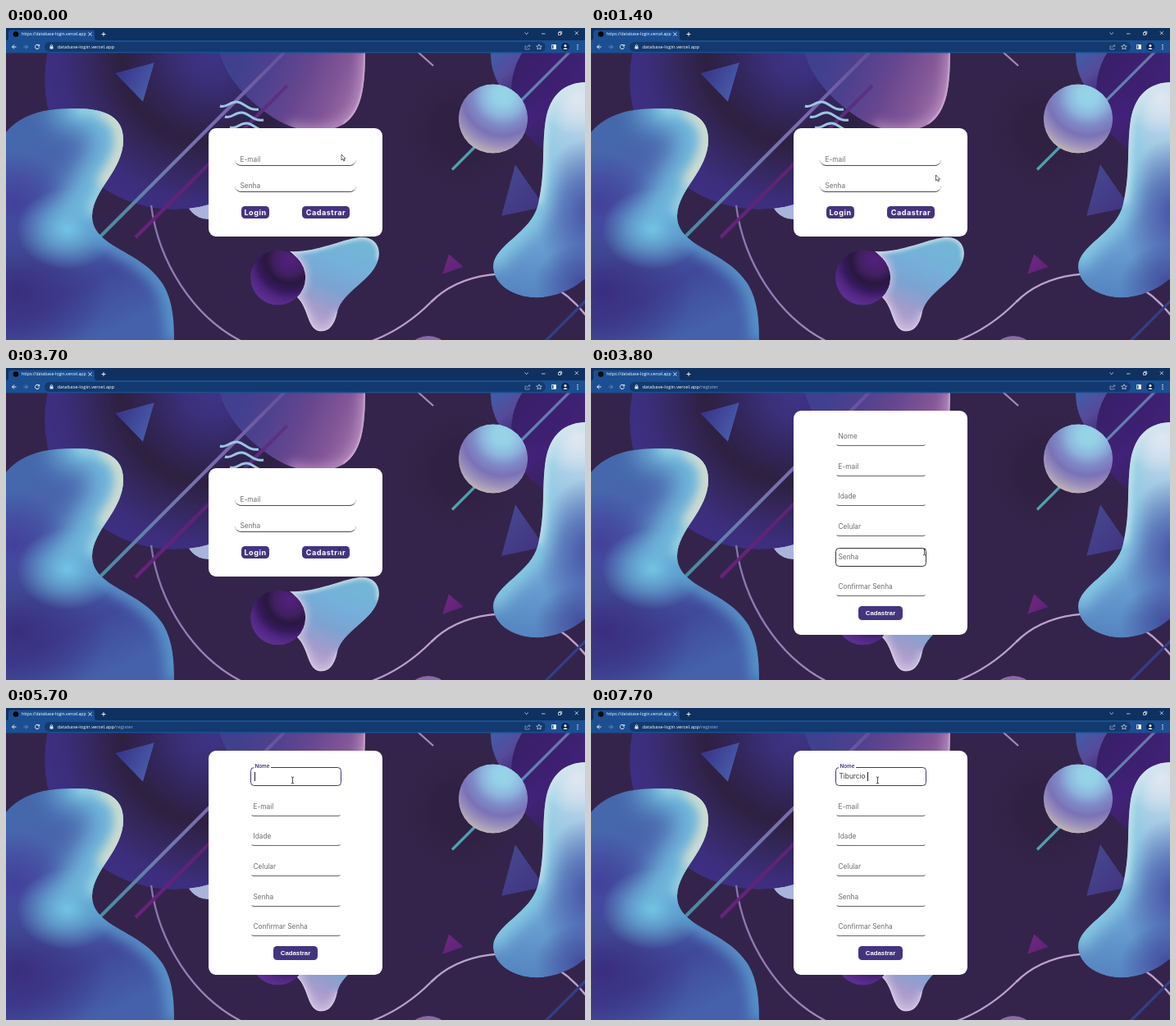
Write an HTML page with a canvas that moves like this. It is 706 px wide and 380 px high and loops after 8000 ms.

```html
<!DOCTYPE html>
<html lang="pt-BR">
<head>
<meta charset="utf-8">
<title>Login</title>
<style>
html, body { margin: 0; width: 100%; height: 100%; overflow: hidden; background: #33234a; }
#stage { position: relative; width: 706px; height: 380px; overflow: hidden; font: 8.3px Inter, sans-serif; color: #6c6b70; cursor: default; }
#stage > * { position: absolute; }
#scene, #bar { left: 0; top: 0; }
#scene { width: 706px; height: 380px; }
.card { left: 247px; width: 212px; background: #fff; border-radius: 9.5px; }
#login { top: 122px; height: 132px; }
#register { top: 52px; height: 273px; }
.card * { position: absolute; box-sizing: border-box; white-space: pre; }
.line { left: 32px; width: 148px; height: 16px; padding-left: 6.5px; line-height: 16px; border-bottom: 1.5px solid #4b494f; border-radius: 8px; }
.field { left: 51px; width: 111px; height: 23px; border: 1.5px solid transparent; border-bottom-color: #66646c; border-radius: 4.5px; }
.field.hover { border-color: #32303b; }
.field.focus { border-color: #43327e; }
.label { left: 1px; top: 6px; padding: 0 1.5px; line-height: 8px; background: #fff; }
.typed { left: 3.5px; top: 0; line-height: 20px; color: #39373d; }
.typed * { position: static; font-weight: 400; }
.typed i { display: inline-block; width: .8px; height: 11px; background: #222; vertical-align: middle; }
.button { text-align: center; color: #fff; background: #44347f; border-radius: 4.5px; }
#login .button { top: 95px; height: 15px; font-weight: 700; font-size: 9.1px; line-height: 15px; letter-spacing: .5px; }
#register .button { left: 79px; top: 238px; width: 54px; height: 17px; font: bold 7.8px/17px "Liberation Sans", Arial, sans-serif; }
#mouse { left: 0; top: 0; width: 12px; height: 14px; overflow: visible; }
#bar text { font-family: "Open Sans", sans-serif; fill: #fff; }
</style>
</head>
<body>
<div id="stage">
  <canvas id="scene"></canvas>
  <svg id="bar" width="706" height="31" fill="none" stroke="#fff">
    <g stroke="none">
      <rect width="706" height="20" fill="#0e315f"/>
      <path d="M0 15Q3 15 3 12V5Q3 2.500 6 2.500H105Q108 2.500 108 5.500V12Q108 15 111 15H706V30.600H0Z" fill="#1b4f92"/>
      <rect x="47" y="17" width="611" height="12" rx="6" fill="#123a70"/>
      <circle cx="12" cy="7.5" r="3.3" fill="#000"/>
      <text x="19" y="9.4" font-size="5.14">https://database-login.vercel.app</text>
      <text x="62.5" y="25" font-size="5.83">database-login.vercel.app<tspan id="path" fill="#9fb6d6">/register</tspan></text>
      <rect x="53.5" y="22.3" width="4" height="3.2" rx=".5" fill="#dce6f3"/>
      <rect x="667.5" y="20.5" width="3" height="5" fill="#fff"/>
      <circle cx="682" cy="23" r="5" fill="#0a2850"/>
      <circle cx="682" cy="21.6" r="1.5" fill="#fff"/>
      <path d="M679.2 26Q682 22.6 684.8 26Z" fill="#fff"/>
      <path d="M696.4 20h1.2v1.2h-1.2zM696.4 22.5h1.2v1.2h-1.2zM696.4 25h1.2v1.2h-1.2z" fill="#fff"/>
    </g>
    <path d="M100.5 5.5l4 4m0-4l-4 4M119 5v5m-2.500-2.500h5M12.500 23H7.500m2.500-2.500L7.500 23l2.500 2.500M40 21.200a2.600 2.600 0 1 0 .6 2.300M40.700 20v2h-2M54.300 22.300v-1q1.200-2 2.400 0v1" stroke-width=".9"/>
    <path d="M21.500 23h5m-2.500-2.500l2.500 2.500l-2.500 2.500" stroke="#6d92c2" stroke-width=".9"/>
    <path d="M632.500 5.500l2.200 2.200l2.200-2.200M653 7h4.500M673.500 5.500h3v3h-3zM674.700 5.500v-1.200h3v3h-1.200M693.800 4.200l4 4m0-4l-4 4M665.500 20.500h5v5h-5z" stroke-width=".7"/>
    <path d="M634.500 22h-1.500v4h5v-1.500M635 24q.5-2.500 4-2.500m-1.500-1.500l1.500 1.500l-1.500 1.500" stroke="#9fb4d0" stroke-width=".7"/>
    <path d="M650 19.800l1 2.200l2.300.2l-1.800 1.500l.6 2.300l-2.100-1.200l-2.100 1.200l.6-2.300l-1.800-1.500l2.300-.2z" stroke="#dbe5f2" stroke-width=".7"/>
  </svg>
  <div class="card" id="login">
    <div class="line" style="top:29.5px">E-mail</div>
    <div class="line" style="top:61.5px">Senha</div>
    <div class="button" style="left:40px;width:34px">Login</div>
    <div class="button" style="left:114px;width:58px">Cadastrar</div>
  </div>
  <div class="card" id="register"><div class="button">Cadastrar</div></div>
  <svg id="mouse"><path id="pointer" stroke-linejoin="round"/></svg>
</div>
<script>
const $ = id => document.getElementById(id);
const clamp = v => Math.max(0, Math.min(1, v));
const mix = (a, b, k) => a + (b - a) * k;

// Background scene
const canvas = $("scene"), ctx = canvas.getContext("2d");

function spread(gradient, colors) {
  colors.forEach((c, i) => gradient.addColorStop(i / (colors.length - 1), c));
  return gradient;
}
const ramp = (x0, y0, x1, y1, ...colors) => spread(ctx.createLinearGradient(x0, y0, x1, y1), colors);
const ball = (x, y, r, ...colors) => spread(ctx.createRadialGradient(x, y, 0, x, y, r), colors);
const disc = (x, y, r) => `M${x - r} ${y}a${r} ${r} 0 1 1 ${2 * r} 0a${r} ${r} 0 1 1 ${-2 * r} 0`;

function stroke(path, color, width) {
  ctx.strokeStyle = color;
  ctx.lineWidth = width;
  ctx.stroke(new Path2D(path));
}

function glow(x, y, r, color, aspect = 1) {
  ctx.save();
  ctx.translate(x, y);
  ctx.scale(1, aspect);
  ctx.fillStyle = ball(0, 0, r, color, color + "90", color + "00");
  ctx.fillRect(-r, -r, 2 * r, 2 * r);
  ctx.restore();
}

// Soft light along a curve
function rim(path, color, width, blur) {
  ctx.filter = `blur(${blur}px)`;
  stroke(path, color, width);
  ctx.filter = "none";
}

function shape(path, fill, ...lights) {
  const p = new Path2D(path);
  ctx.save();
  ctx.clip(p);
  ctx.fillStyle = fill;
  ctx.fill(p);
  lights.forEach(l => typeof l[0] === "string" ? rim(...l) : glow(...l));
  ctx.restore();
}

function drawScene() {
  const dpr = window.devicePixelRatio || 1;
  canvas.width = 706 * dpr;
  canvas.height = 380 * dpr;
  ctx.scale(dpr, dpr);
  ctx.fillStyle = "#34244b";
  ctx.fillRect(0, 0, 706, 380);

  // upper left
  shape(disc(246, 206, 27), "#a9b4dd");
  shape(disc(205, 63, 158), ball(250, 30, 220, "#3e3486", "#3a2f78", "#33265c", "#2d2040", "#35285f", "#3c2e7c", "#3e2f86"));
  stroke("M177 216C186 285 228 352 288 382C400 412 470 382 518 334", ramp(176, 216, 518, 334, "#8674ad", "#a98cc2", "#bda2cd"), 2.3);
  stroke("M518 334C555 297 620 290 662 312C682 322 697 337 708 351", "#bda2cd", 2.5);
  shape("M260 28C268 62 296 88 318 104C348 127 386 132 412 117C434 102 438 72 438 28Z", ramp(285, 40, 430, 105, "#40408f", "#4f418e", "#66468f", "#815696", "#a376ae"),
    ["M439 28C439 76 434 104 412 118C390 130 365 128 345 120", "#bd90c2", 12, 7], ["M438.500 28C438 72 434 102 412 117", "#d8bcdc", 3, 1.5]);
  stroke("M114 255L340 29", ramp(114, 255, 340, 29, "#458f9f", "#6f79ae", "#7b68ae", "#63509b"), 4);
  stroke("M158 255L343 70", ramp(158, 255, 343, 70, "#67237b", "#5b2374", "#5a3484"), 4.5);
  for (let i = 0; i < 3; i++)
    stroke(`M${261 + 6 * i} ${95 + 13 * i}c8 3 12-6 21-5s13 11 26 9`, "#9ac6e2", 3);
  shape("M133 55L181 42L167 90Z", ramp(140, 50, 178, 70, "#38378a", "#485aa8"));

  // upper right
  stroke("M502 29L521 46", "#a48bbb", 2.3);
  glow(555, 125, 75, "#2e2040");
  shape(disc(660, 33, 69), ramp(591, 30, 630, 80, "#3e5fa9", "#564a9a", "#3b2670"));
  shape(disc(702, 76, 86), ramp(620, 40, 706, 140, "#342061", "#42227b", "#33214e"), [660, 60, 55, "#3d1f70"]);
  stroke("M544 172.500L688 28.500", ramp(544, 172, 688, 28, "#4fa3ac", "#5b8db6", "#6970ae"), 3.2);
  shape(disc(594, 110.500, 42.300), ball(606, 82, 74, "#96d6e6", "#94cfe6", "#8db5dd", "#7f8ac7", "#7a72b6", "#9a8fba", "#c2b7b6"));
  shape("M621 166L657 218L604 229Z", ramp(606, 180, 645, 220, "#45488f", "#423581"));
  const rightEdge = "M710 66C682 66 664 80 658 112C653 145 658 176 649 214C641 250 594 264 594 291";
  shape(rightEdge + "C595 316 625 331 655 328C680 325 696 314 710 302Z", ramp(685, 70, 660, 330, "#d5e2ef", "#a9cde6", "#7db5dc", "#689ed1", "#5584c0"),
    [712, 225, 65, "#4650a4", 1.4], [705, 310, 60, "#424b9c", .8], [rightEdge, "#8bd0e6", 22, 10], [695, 85, 45, "#dfe7f1"],
    ["M710 66C682 66 664 80 658 112C653 145 658 176 649 214", "#dbe8ec", 6, 4]);

  // lower left
  const leftEdge = "M84 98C124 98 143 110 143 136C143 174 106 196 105 229";
  shape("M-2 129C20 102 50 98 84 98C124 98 143 110 143 136C143 174 106 196 105 229C105 268 166 270 192 313C204 334 205 358 205 382H-2Z", ramp(10, 130, 130, 370, "#4568ac", "#4a62ac", "#4465aa", "#40489a", "#4561ab"),
    [10, 215, 65, "#42409a"], [15, 320, 110, "#3a2d7e", .8], [75, 245, 62, "#72c3e4", .8],
    ["M60 98C118 96 138 118 128 145C112 185 88 195 92 235", "#78c4e3", 42, 16],
    [leftEdge + "C105 268 166 270 192 313C204 334 205 358 205 382", "#5fa8d6", 16, 9],
    [leftEdge, "#a3dae5", 14, 7], ["M116 98C138 104 145 124 142 145C139 162 128 176 118 192", "#d3dcce", 20, 7]);

  // lower middle
  const topEdge = "M346 272C376 274 408 258 430 255C449 253 458 266 454 282";
  const lowEdge = "M404 346C400 365 391 371 381 369C367 365 369 340 354 327C368 310 368 288 346 272";
  shape(topEdge + "C448 307 411 320 404 346" + lowEdge.slice(8).replace(/^/, "") + "Z", ramp(420, 260, 374, 372, "#72b6d6", "#75b0da", "#7ba3d2", "#a59bcb", "#c9aed5"),
    [lowEdge, "#cfc4e2", 8, 5], [topEdge, "#d5e2ea", 5, 2.5], [lowEdge, "#e0d5e8", 2, 1]);
  shape(disc(331.600, 304, 33.600), ball(346, 282, 58, "#52217a", "#4c1f72", "#40205f", "#2a1740", "#35195a", "#502682", "#5c2f90"));
  shape("M540 275L558 291L532 300Z", ramp(535, 280, 555, 298, "#71267f", "#5a2378"));
  shape(disc(515, 405, 30), "#8a69a8");
  stroke("M657 382L708 331", "#343f88", 3.2);
}

// Register form
const fields = ["Nome", "E-mail", "Idade", "Celular", "Senha", "Confirmar Senha"].map((text, i) => {
  const el = document.createElement("div");
  el.style.top = 20 + 36.65 * i + "px";
  el.innerHTML = `<span class="label">${text}</span>`;
  $("register").append(el);
  return el;
});
const label = fields[0].firstChild;
const typed = document.createElement("span");
typed.className = "typed";
typed.innerHTML = "<b></b><i></i>";
fields[0].append(typed);
const [value, caret] = typed.children;

// Timeline
const LOOP = 8000, OPEN = 3800, FOCUS = 4700;
const NAME = "Tiburcio ";
const KEYS = [6100, 6500, 6700, 6800, 7100, 7200, 7400, 7500, 7700];
const ROUTE = [[0, 409, 154], [900, 420.5, 179], [1400, 420.5, 179], [2300, 588, 178], [2500, 588, 178], [3500, 406.5, 224], [3800, 406.5, 224], [4500, 349.5, 88], [LOOP, 349.5, 88]];
const POINTERS = {
  arrow: ["M0 0V7L1.700 5.500L2.800 8L4 7.500L2.900 5.100H5Z", "#fff", "#29272e", .7],
  text: ["M-1.500 -4Q0 -4 0 -3V3Q0 4 -1.500 4M1.500 -4Q0 -4 0 -3M0 3Q0 4 1.500 4", "none", "#222", .8]
};

function mouseAt(t) {
  const n = ROUTE.findIndex(p => p[0] > t);
  const [a, b] = [ROUTE[n - 1], ROUTE[n]];
  const k = (t - a[0]) / (b[0] - a[0]), e = k * k * (3 - 2 * k);
  return [mix(a[1], b[1], e), mix(a[2], b[2], e)];
}

const inside = (x, y, l, t, r, b) => x >= l && x <= r && y >= t && y <= b;

function render(t) {
  const open = t >= OPEN, focus = t >= FOCUS, [x, y] = mouseAt(t);
  $("login").style.display = open ? "none" : "block";
  $("register").style.display = open ? "block" : "none";
  $("path").style.display = open ? "inline" : "none";

  const over = fields.map((f, i) => inside(x, y, 298, 72 + 36.65 * i, 409, 95 + 36.65 * i));
  fields.forEach((f, i) => {
    f.className = "field" + (focus && i === 0 ? " focus" : over[i] ? " hover" : "");
  });
  const overLogin = [[279, 155, 427, 168], [279, 185, 427, 200], [361, 217, 419, 232]].some(box => inside(x, y, ...box));
  const kind = (open ? over.includes(true) : overLogin) ? "text" : "arrow";

  const k = clamp((t - FOCUS + 100) / 200);
  const up = focus ? 1 - (1 - k) ** 2 : 0;
  label.style.cssText = `left:${mix(1, 3, up)}px;top:${mix(6, -6.5, up)}px;font-size:${mix(8.3, 6.3, up)}px;` +
    (focus ? "color:#43327e;font-weight:600" : "");
  const count = KEYS.filter(key => key <= t).length;
  const since = t - (count ? KEYS[count - 1] : FOCUS);
  typed.style.display = focus ? "block" : "none";
  value.textContent = NAME.slice(0, count);
  caret.style.visibility = since % 1000 < 500 ? "visible" : "hidden";

  const [d, fill, line, width] = POINTERS[kind], p = $("pointer");
  p.setAttribute("d", d);
  p.setAttribute("fill", fill);
  p.setAttribute("stroke", line);
  p.setAttribute("stroke-width", width);
  $("mouse").style.transform = `translate(${x}px,${y}px)`;
}

function tick() {
  render(Math.floor(performance.now() % LOOP / 100) * 100);
  requestAnimationFrame(tick);
}

drawScene();
tick();
</script>
</body>
</html>
```
